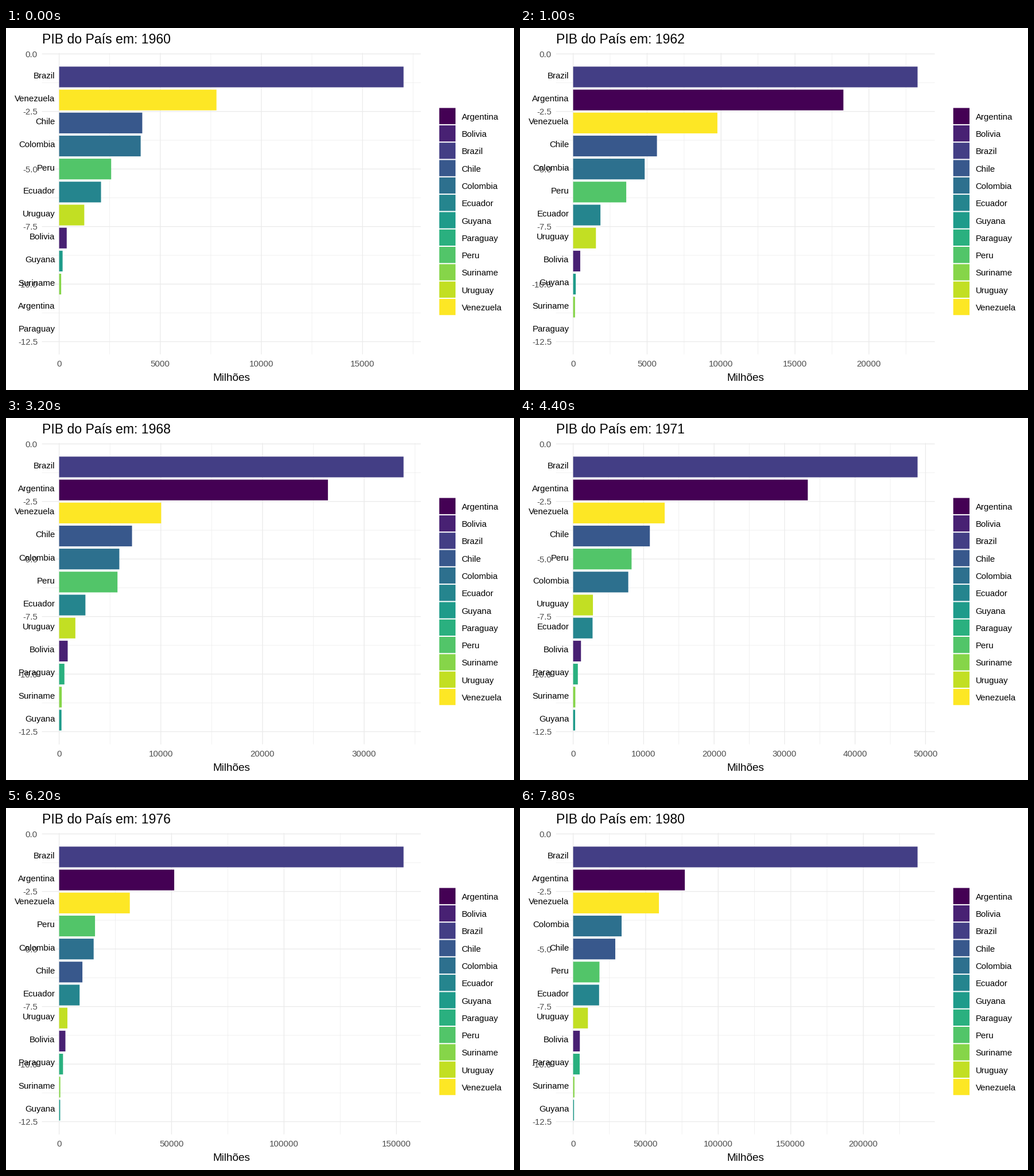
These frames come from a looping animation (885 by 632 pixels, 8000 ms). A matplotlib script:

```python
import numpy as np
import matplotlib.pyplot as plt
from matplotlib.animation import FuncAnimation
from matplotlib.patches import Rectangle

plt.rcParams["font.family"] = "Liberation Sans"

W, H, DPI = 885, 632, 100
FRAMES, STEP_MS = 40, 200
LEFT, RIGHT, TOP, BOTTOM = 62.6, 722.6, 43.5, 569.8   # panel
X0, BAR_MAX = 92.6, 600                               # zero line, longest bar
Y0, ROW = 45.3, 40.18                                 # rank zero, rank spacing
GRID, GREY = "#EBEBEB", "#4D4D4D"
MAJOR, MINOR = 1.33, 0.67

COUNTRIES = ["Argentina", "Bolivia", "Brazil", "Chile", "Colombia", "Ecuador",
             "Guyana", "Paraguay", "Peru", "Suriname", "Uruguay", "Venezuela"]
COLORS = dict(zip(COUNTRIES, plt.cm.viridis(np.linspace(0, 1, len(COUNTRIES)))))

# GDP in millions; years between the anchors are interpolated geometrically
YEARS = np.arange(1960, 1981)
LARGE = {
    "Brazil": [17030, 17275, 19231, 23287, 21212, 22465, 27063, 31087, 33876,
               37172, 42328, 48870, 58435, 83592, 109795, 129204, 153169,
               176344, 200279, 221338, 237393],
    "Argentina": [0, 0, 24451, 18272, 25605, 28345, 28630, 24257, 26437, 31256,
                  31584, 33293, 34733, 52544, 72437, 52439, 51170, 56781,
                  58083, 69252, 76962],
}
MID_YEARS = [1960, 1963, 1965, 1966, 1968, 1971, 1973, 1974, 1975, 1976, 1978, 1980]
MID = {
    "Venezuela": [7779, 9753, 8428, 8781, 10034, 12987, 17036, 26101, 27465, 31420, 39316, 59117],
    "Chile": [4110, 5666, 6026, 7073, 7167, 10884, 16837, 16210, 7622, 10341, 16100, 29037],
    "Colombia": [4031, 4836, 5761, 5428, 5918, 7820, 10316, 12370, 13099, 15341, 23264, 33401],
    "Peru": [2572, 3590, 5167, 6113, 5737, 8290, 10995, 13858, 16877, 15948, 12382, 18134],
    "Ecuador": [2070, 1845, 2387, 2429, 2583, 2754, 3892, 6599, 7732, 9092, 11922, 17882],
    "Uruguay": [1242, 1540, 1891, 1809, 1594, 2807, 3964, 4090, 3538, 3667, 4910, 10163],
}
SMALL_YEARS = [1960, 1963, 1965, 1968, 1971, 1976, 1980]
SMALL = {
    "Bolivia": [374, 479, 607, 840, 1110, 2780, 4600],
    "Paraguay": [0, 0, 444, 517, 665, 1720, 4500],
    "Suriname": [100, 126, 154, 255, 308, 520, 891],
    "Guyana": [170, 176, 213, 230, 282, 454, 603],
}


def series(anchors, values):
    logs = np.log(np.maximum(values, 1e-9))
    return np.round(np.exp(np.interp(YEARS, anchors, logs)), 1)


GDP = {name: series(anchors, values)
       for anchors, group in ((YEARS, LARGE), (MID_YEARS, MID), (SMALL_YEARS, SMALL))
       for name, values in group.items()}


def tick_step(top):
    for limit, step in ((28000, 5000), (70000, 10000), (100000, 20000), (140000, 25000)):
        if top < limit:
            return step
    return 50000


fig = plt.figure(figsize=(W / DPI, H / DPI), dpi=DPI, facecolor="white")
ax = fig.add_axes([0, 0, 1, 1])
ax.set_xlim(0, W)
ax.set_ylim(H, 0)
ax.axis("off")


def text(x, y, s, px, color="black", ha="left", z=5):
    return ax.text(x, y, s, fontsize=px * 72 / DPI, color=color, ha=ha,
                   va="baseline", zorder=z)


def line(xs, ys, px):
    return ax.plot(xs, ys, color=GRID, lw=px * 72 / DPI, zorder=1 + px,
                   solid_capstyle="butt", snap=False)[0]


def box(x, y, w, h, color):
    return ax.add_patch(Rectangle((x, y), w, h, fc=color, lw=0, zorder=3, snap=False))


# Fixed parts: horizontal grid, rank axis, axis title, legend
for k in range(6):
    y = Y0 + 2.5 * k * ROW
    line([LEFT, RIGHT], [y, y], MAJOR)
    text(55, y + 5.7, f"{-2.5 * k if k else 0:.1f}", 15, GREY, "right", 4)
    if k < 5:
        mid = y + 1.25 * ROW
        line([LEFT, RIGHT], [mid, mid], MINOR)
text((LEFT + RIGHT) / 2, 616, "Milhões", 19, ha="center")
for k, name in enumerate(COUNTRIES):
    y = 139.6 + 30.3 * k
    box(754.8, y, 28.3, 28.3, COLORS[name])
    text(793.5, y + 20.2, name, 15)

# Moving parts
title = text(LEFT, 27, "", 23)
bars = {name: box(X0, 0, 0, 0.9 * ROW, COLORS[name]) for name in COUNTRIES}
labels = {name: text(85.3, 0, name, 15, ha="right") for name in COUNTRIES}
majors = [line([0, 0], [TOP, BOTTOM], MAJOR) for _ in range(8)]
minors = [line([0, 0], [TOP, BOTTOM], MINOR) for _ in range(8)]
ticks = [text(0, 591, "", 15, GREY, "center") for _ in range(8)]


def place(grid_line, x):
    grid_line.set_xdata([x, x])
    grid_line.set_visible(x <= RIGHT)
    return x <= RIGHT


def update(i):
    # Bars jump half a step before the title; one half step is skipped
    n = i if i < 27 else i + 1
    title.set_text(f"PIB do País em: {1960 + n // 2}")
    now = {name: GDP[name][(n + 1) // 2] for name in COUNTRIES}
    top = max(now.values())
    scale = BAR_MAX / top

    for rank, name in enumerate(sorted(COUNTRIES, key=lambda c: -now[c]), 1):
        y = Y0 + rank * ROW
        bars[name].set_y(y - 0.45 * ROW)
        bars[name].set_width(now[name] * scale)
        bars[name].set_visible(now[name] > 0)
        labels[name].set_y(y + 2.4)

    step = tick_step(top)
    for k, tick in enumerate(ticks):
        x = X0 + k * step * scale
        tick.set_visible(place(majors[k], x))
        tick.set_x(x)
        tick.set_text(str(k * step))
        place(minors[k], x + step * scale / 2)
    return []


anim = FuncAnimation(fig, update, frames=FRAMES, interval=STEP_MS,
                     init_func=lambda: update(0), repeat=True, repeat_delay=0)
plt.show()
```
